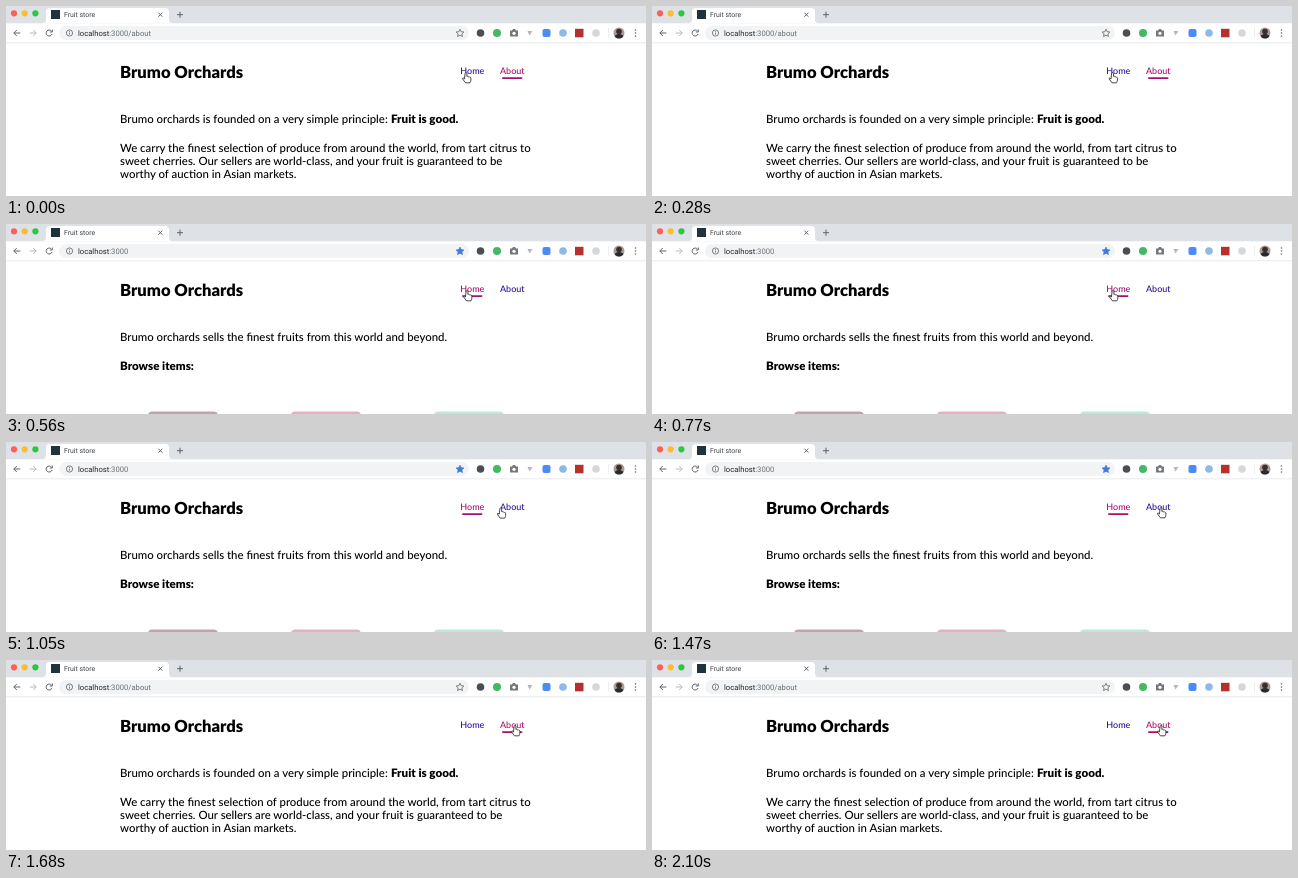
Recreate the animation shown at these times as an HTML page. Size 640 by 190 pixels, loop 2.24 s.

```html
<!DOCTYPE html>
<html lang="en">
<head>
<meta charset="utf-8">
<title>Fruit store</title>
<style>
  html, body { margin: 0; width: 100%; height: 100%; overflow: hidden; background: #fff; }
  svg { display: block; width: 100%; height: 100%; text-rendering: geometricPrecision; }
  .chrome { font-family: Roboto, sans-serif; }
  .page { font: 500 11.4px Lato, sans-serif; }
  .strong { font-weight: 900; font-size: 11.6px; }
  .nav { font-size: 9px; fill: #30109a; }
  .nav rect { visibility: hidden; }
  .nav .active { fill: #a8106c; }
  .nav .active rect { visibility: visible; }
  .line { fill: none; stroke: #5f6368; stroke-width: 1; }
</style>
</head>
<body>
<svg viewBox="0 0 640 190">
  <g class="chrome">
    <!-- Tab strip -->
    <rect width="640" height="17.3" fill="#dee1e6"/>
    <path d="M36 17.3q4 0 4-4V6q0-4 4-4H159q4 0 4 4v7.300q0 4 4 4z" fill="#fff"/>
    <circle cx="8" cy="7.300" r="3.100" fill="#ff5f57"/>
    <circle cx="18.700" cy="7.300" r="3.100" fill="#febc2e"/>
    <circle cx="29.400" cy="7.300" r="3.100" fill="#28c840"/>
    <rect x="45" y="4" width="9" height="9" fill="#20323b"/>
    <text x="58" y="11.300" font-size="6.900" fill="#3c4043">Fruit store</text>
    <path class="line" d="M152.400 6.700l4 4m0-4l-4 4M171 8.700h6m-3-3v6"/>

    <!-- Toolbar -->
    <path class="line" d="M14.300 27H7.800m3-3l-3 3 3 3"/>
    <path class="line" d="M23.700 27h6.500m-3-3l3 3-3 3" style="stroke:#b8babd"/>
    <path class="line" d="M45.600 25.300A3 3 0 1 0 46 28M46.300 23.500v2.500h-2.500"/>
    <rect x="53" y="20" width="410" height="14" rx="7" fill="#f1f3f4"/>
    <circle class="line" cx="63.500" cy="27" r="3.100" style="stroke-width:.8"/>
    <path class="line" d="M63.500 26.600v2M63.500 25v.8" style="stroke-width:.8"/>
    <text x="72" y="29.700" font-size="7.650" fill="#25282b">localhost<tspan fill="#6b6f73">:3000<tspan id="path">/about</tspan></tspan></text>
    <path id="star" d="M454 23.200l1.150 2.500 2.750.3-2.050 1.850.6 2.700-2.450-1.400-2.450 1.400.6-2.700-2.050-1.850 2.750-.3z" stroke-width=".8"/>

    <!-- Extensions and profile -->
    <circle cx="474.500" cy="27" r="3.800" fill="#4b4e52"/>
    <circle cx="491" cy="27" r="4" fill="#45b864"/>
    <path d="M504 24.500h2l1-1.500h2l1 1.500h2v6h-8z" fill="#75797d"/>
    <circle cx="508" cy="27.300" r="1.600" fill="#fff"/>
    <path d="M521.500 25h5l-3 4.500z" fill="#b4b7ba"/>
    <rect x="536.500" y="23" width="8" height="8" rx="2" fill="#4a8cf7"/>
    <circle cx="557" cy="27" r="3.800" fill="#8db9e8"/>
    <rect x="569" y="22.800" width="8.500" height="8.500" fill="#b6302d"/>
    <circle cx="590" cy="27" r="3.800" fill="#d6d7d9"/>
    <path class="line" d="M602.500 22v10" style="stroke:#eceef0"/>
    <clipPath id="avatar"><circle cx="613" cy="27" r="5.500"/></clipPath>
    <g clip-path="url(#avatar)">
      <rect x="607" y="21" width="12" height="12" fill="#a99b95"/>
      <circle cx="613" cy="25.500" r="2.800" fill="#3a2d2b"/>
      <ellipse cx="613" cy="32" rx="5" ry="4" fill="#292a30"/>
    </g>
    <g fill="#5f6368">
      <circle cx="629.500" cy="24" r=".8"/><circle cx="629.500" cy="27" r=".8"/><circle cx="629.500" cy="30" r=".8"/>
    </g>
    <rect y="36.500" width="640" height=".7" fill="#dfe1e4"/>
  </g>

  <g class="page">
    <text x="114" y="71.500" font-size="16.600" font-weight="900">Brumo Orchards</text>
    <g class="nav">
      <g id="homeLink"><text x="454.300" y="68.300">Home</text><rect x="456" y="71.200" width="20.500" height="1.700" rx=".8"/></g>
      <g id="aboutLink"><text x="494" y="68.300">About</text><rect x="496" y="71.200" width="20.500" height="1.700" rx=".8"/></g>
    </g>

    <g id="about">
      <text x="114" y="117">Brumo orchards is founded on a very simple principle:</text>
      <text x="385" y="117" class="strong">Fruit is good.</text>
      <text x="114" y="146.200">We carry the finest selection of produce from around the world, from tart citrus to</text>
      <text x="114" y="159.200">sweet cherries. Our sellers are world-class, and your fruit is guaranteed to be</text>
      <text x="114" y="172.200">worthy of auction in Asian markets.</text>
    </g>

    <g id="home">
      <text x="114" y="117">Brumo orchards sells the finest fruits from this world and beyond.</text>
      <text x="114" y="146.200" class="strong">Browse items:</text>
      <rect x="142" y="187.500" width="70" height="20" rx="4" fill="#c3a2b0"/>
      <rect x="285" y="187.500" width="70" height="20" rx="4" fill="#e5b0c2"/>
      <rect x="428" y="187.500" width="70" height="20" rx="4" fill="#bce7df"/>
    </g>
  </g>

  <path id="cursor" fill="#fff" stroke="#222" stroke-width=".9" stroke-linejoin="round"
    d="M-1 1q0-1.200 1-1.200q1 0 1 1.200v3q1.200-.5 1.600.4q1.200-.3 1.500.5q1.200 0 1.200 1v2.200q0 1-1 2.900h-5q-1-1.600-3-4.200q-.3-1.100.7-1l1.300 1z"/>
</svg>
<script>
  const LOOP = 2240, STEP = 70;
  const HOME_CLICK = 560, ABOUT_CLICK = 1680;
  const MOVE_START = 840, MOVE_END = 1470;
  const get = id => document.getElementById(id);
  const progress = (time, from, to) => Math.min(1, Math.max(0, (time - from) / (to - from)));

  // The pointer drifts over Home, then glides to About with a cubic ease-out.
  function pointerAt(time) {
    const drift = progress(time, 0, 490);
    const glide = 1 - (1 - progress(time, MOVE_START, MOVE_END)) ** 3;
    return [460 + drift + 48 * glide, 66.7 - glide];
  }

  function draw(now) {
    const time = Math.floor((now % LOOP) / STEP) * STEP;
    const onHome = time >= HOME_CLICK && time < ABOUT_CLICK;
    const show = (id, visible) => get(id).style.display = visible ? '' : 'none';

    show('home', onHome);
    show('about', !onHome);
    show('path', !onHome);
    get('homeLink').classList.toggle('active', onHome);
    get('aboutLink').classList.toggle('active', !onHome);
    get('star').setAttribute('fill', onHome ? '#4179e0' : 'none');
    get('star').setAttribute('stroke', onHome ? '#4179e0' : '#5f6368');
    get('cursor').setAttribute('transform', `translate(${pointerAt(time)}) scale(.92)`);
  }

  let start;
  function tick(now) {
    start ??= now;
    draw(now - start);
    requestAnimationFrame(tick);
  }
  draw(0);
  requestAnimationFrame(tick);
</script>
</body>
</html>
```
